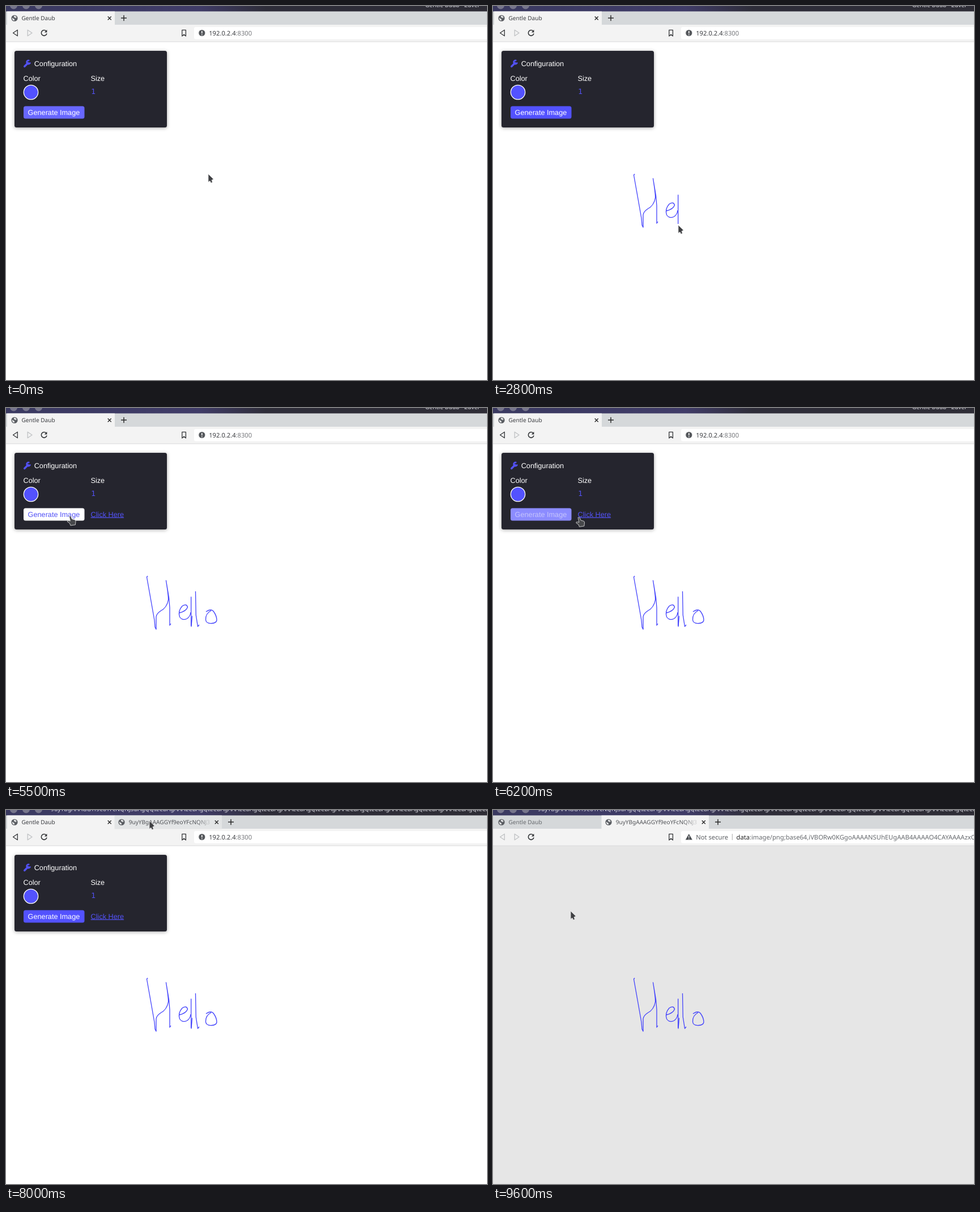
An HTML page for the animation above (9.7 s loop, 849 px wide and 659 px high).

```html
<!DOCTYPE html>
<html lang="en">
<head>
<meta charset="utf-8">
<title>Drawing demo</title>
<style>
  html, body { margin: 0; width: 100%; height: 100%; overflow: hidden; background: #fff; }
  svg { display: block; text-rendering: geometricPrecision; }
  text { white-space: pre; }
  .ui { font: 10.07px "Noto Sans", sans-serif; fill: #3a3c40; }
  .address { font-size: 11.2px; }
  .page { font: 12.7px "Liberation Sans", Arial, sans-serif; fill: #fff; }
  .line { fill: none; stroke-width: 1.3; }
  #panel { filter: drop-shadow(0 1px 3px rgba(0, 0, 0, .35)); }
</style>
</head>
<body>
<svg id="stage" width="849" height="659" viewBox="0 0 849 659">
  <defs>
    <linearGradient id="bar">
      <stop offset="0" stop-color="#3a3960"/><stop offset=".4" stop-color="#403c68"/>
      <stop offset=".54" stop-color="#2e2d39"/><stop offset="1" stop-color="#2e2d36"/>
    </linearGradient>
    <linearGradient id="fade" gradientUnits="userSpaceOnUse" x1="335" x2="362">
      <stop offset="0" stop-color="#505256"/><stop offset="1" stop-color="#505256" stop-opacity=".1"/>
    </linearGradient>
    <g id="globe">
      <circle r="5.6" fill="#5a5d62"/>
      <path d="M-4 -1Q-2.5 1 -.5 1.2Q.8 2 -.6 4.4Q-4 3.6 -4.2 0ZM-.5 -4.4Q2.8 -4.2 3.6 -1.8L2 .2Q1.6 -1.6 -.6 -1.2Q-1.8 -2.6 -.5 -4.4Z" fill="#e6e7e8"/>
    </g>
    <path id="close" d="M-3 -3L3 3M3 -3L-3 3" stroke="#2b2b2b" stroke-width="1.4"/>
  </defs>

  <rect id="canvas" y="63" width="849" height="596"/>
  <g id="panel">
    <rect x="15" y="79" width="269" height="135" rx="3.5" fill="#25252e"/>
    <path d="M32.7 106.5L39 100.2" stroke="#5352f6" stroke-width="3.4" stroke-linecap="round"/>
    <path d="M41.2 96.3A3.1 3.1 0 1 0 42.7 99.5" fill="none" stroke="#5352f6" stroke-width="2.6"/>
    <g class="page">
      <text x="49.7" y="106">Configuration</text>
      <text x="30.5" y="132">Color</text>
      <text x="149.5" y="132">Size</text>
      <text x="150.2" y="154.5" font-family="DejaVu Sans, sans-serif" style="fill:#5352f6">1</text>
      <circle cx="44" cy="152" r="12.7" fill="#5352ff" stroke="#fff" stroke-width="1.3"/>
      <rect id="button" x="31" y="176.5" width="107.5" height="22" rx="3.5"/>
      <text id="label" x="38.6" y="191.5">Generate Image</text>
      <text id="link" x="149.6" y="191.5" style="fill:#5352f6" text-decoration="underline">Click Here</text>
    </g>
  </g>
  <g id="ink" class="line" stroke="#4242fc" stroke-linejoin="round"></g>

  <rect width="849" height="10" fill="url(#bar)"/>
  <g fill="#77768c"><circle cx="13.5" cy="-1" r="6.5"/><circle cx="35.5" cy="-1" r="6.5"/><circle cx="57.5" cy="-1" r="6.5"/></g>
  <text id="title" class="ui" y="2.2" style="fill:#dcdce4;font-size:10.3px"></text>
  <rect y="9.5" width="849" height="24" fill="#d5d8da"/>
  <rect y="33" width="849" height="30" fill="#f3f3f3"/>
  <rect y="62.5" width="849" height="1" fill="#d9dadb"/>
  <rect x="332" y="37" width="530" height="21.5" rx="3" fill="#fff"/>
  <rect id="firstTab" x="2" y="9.5" width="190" height="24" fill="#f3f3f3"/>
  <use href="#globe" x="15" y="21.5"/>
  <text id="firstName" class="ui" x="27.5" y="25.2">Gentle Daub</text>
  <use id="firstClose" href="#close" x="182.7" y="21.5"/>
  <g id="secondTab">
    <rect id="secondBack" x="191.5" y="9.5" width="189.5" height="24"/>
    <use href="#globe" x="204" y="21.5"/>
    <text id="secondName" class="ui" x="216.7" y="25.2" style="fill:url(#fade)"></text>
    <use href="#close" x="371.8" y="21.5"/>
  </g>
  <path id="plus" d="M-5 0H5M0 -5V5" stroke="#2b2b2b" stroke-width="1.5"/>
  <g class="line" stroke="#343639" stroke-linejoin="round">
    <path id="back" d="M12.5 47.5L20.3 42.2V52.8Z"/>
    <path d="M46 47.5L38.2 42.2V52.8Z" stroke="#bfc1c3"/>
    <path d="M71 44.3A4.9 4.9 0 1 0 72 48.5" stroke-width="1.6"/>
    <path d="M72.4 41.8V46.4H67.8Z" fill="#343639" stroke="none"/>
    <path d="M310.8 42.3H317.4V53L314.1 50.2L310.8 53Z"/>
  </g>
  <g id="localSite">
    <circle cx="345.8" cy="47.5" r="5.6" fill="#55585c"/>
    <path d="M345.8 44V48.6M345.8 50V51.4" stroke="#fff" stroke-width="1.5"/>
    <text class="ui address" x="358.2" y="51.5">192.0.2.4<tspan fill="#77797d">:8300</tspan></text>
  </g>
  <g id="imageSite">
    <path d="M345.8 42L351.8 52.6H339.8Z" fill="#484b4f"/>
    <path d="M345.8 45.4V49M345.8 50.2V51.4" stroke="#fff" stroke-width="1.2"/>
    <text class="ui address" x="358.3" y="51.5" style="fill:#5c5f63">Not secure</text>
    <path d="M422.3 42V53" stroke="#aaa"/>
    <text class="ui address" x="429.5" y="51.5" style="fill:#66696d"><tspan fill="#222">data</tspan><tspan>:image/png;</tspan><tspan id="payload"></tspan></text>
  </g>

  <g id="menu" class="ui"></g>
  <g id="arrow" stroke="#e8e8e8" stroke-width=".8" fill="#3f4043">
    <path d="M0 0V14.2L3 12.2L4.8 15.8L7.4 14.6L6 10.8L9.4 9.2Z"/>
  </g>
  <g id="hand" stroke="#e8e8e8" stroke-width=".8" fill="#47484b">
    <path d="M-1.3 1Q0 -.8 1.4 .8L3.4 5.6L8.4 7Q10.2 7.6 10 9.8L9.4 15.8L.9 17L-.6 13L-4.4 10.6Q-5.4 8.6 -3.2 8.4L.4 9.2Z"/>
  </g>
</svg>
<script>
const LOOP = 9700, STEP = 100;
const $ = id => document.getElementById(id);
const SVG_NS = "http://www.w3.org/2000/svg";

// Spans in which the picture rests at its earlier state.
const rests = [[2400, 2800], [3600, 3900], [4600, 4900], [5200, 5500],
  [5700, 6000], [6900, 7100], [7500, 7800], [8300, 8600]];

const strokes = [
  [1600, 2100, "M250 296L248.5 298L256 340L262 374L263 386L265 390V368Q266 362 273 357.5Q284 352 286.5 338Q287 332 282.5 304L287.5 334L289 352V383L291 380"],
  [2200, 2700, "M306 361Q318 358 320.5 351Q319 344 311 349Q303 358 306.5 368Q311 375 319 371.5Q325 368 326 360"],
  [2700, 2800, "M326.7 332.5V384"],
  [2800, 2900, "M326.7 384L328.5 367L327 385.5"],
  [2900, 3200, "M334.5 323L335.3 365L338.5 385L341 382"],
  [3300, 3600, "M353 359Q362 353 366 358Q372 366 372 374Q371 379 363 379.5Q353 380 352.5 373Q352 362 362 357"]
].map(([from, to, d]) => {
  const path = document.createElementNS(SVG_NS, "path");
  path.setAttribute("d", d);
  $("ink").append(path);
  return { from, to, path, length: path.getTotalLength() };
});

const moves = [
  [0, 357, 296], [300, 490, 338], [500, 700, 240], [650, 776, 110], [750, 720, 0],
  [950, 420, 60], [1100, 240, 96], [1300, 120, 186], [1600, 249, 297], [2100, 291, 380],
  [2200, 306, 361], [2800, 327, 386], [2900, 334, 323], [3200, 341, 382], [3300, 353, 359],
  [3600, 362, 357], [3900, 371, 372], [4200, 250, 280], [4500, 120, 193], [4900, 110, 194],
  [5200, 113, 190], [6000, 113, 190], [6400, 190, 194.5], [7500, 190, 194.5], [7800, 225, 90],
  [7900, 253, 19], [8200, 253, 19], [8300, 262, 30], [8600, 370, 100], [8800, 466, 230],
  [9100, 350, 390], [9400, 124, 280], [9600, 137, 178]
];
const hover = [[0, .12], [200, 0], [1200, 0], [1300, .5], [1500, 0],
  [4400, 0], [4600, 1], [6000, 1], [6300, 0]];

const secondName = "9uyYBgAAAGGYf9eoYFcNQNJ3";
$("secondName").textContent = secondName;
$("payload").textContent = "base64,iVBORw0KGgo" + "A".repeat(4) + "NSUhEUgAAB4" + "A".repeat(4) + "O4CAY" + "A".repeat(4) + "zxCB";
const longTitle = secondName + "BAgQQ" + "IECBAgAAAECBAgQ".repeat(9);

function buildMenu() {
  const items = [["Open link in new tab", 201.7], ["Open link in new window", 221.5],
    ["Open link in private window", 241.3], ["Open link in private window with Lur", 261],
    ["Save link as…", 289.7], ["Copy link address", 309.4], ["Zuvel", 338], ["Inspect", 366.5]];
  const texts = items.map(([name, y]) => `<text x="196.7" y="${y}">${name}</text>`).join("");
  const rules = [271, 319.8, 348.4].map(y => `M168 ${y}H445`).join("");
  $("menu").innerHTML = `
    <rect x="168.4" y="184.9" width="276.4" height="189.8" fill="#fff" stroke="#cfd0d2"/>
    <rect x="169" y="188" width="275.5" height="19.5" fill="#e4e4e4"/>
    <path d="${rules}" stroke="#cfd0d2"/><g fill="#2f3236">${texts}</g>
    <circle cx="181" cy="334" r="6" fill="#ee6530"/>
    <path d="M434.5 330.8L439 334L434.5 337.2Z" fill="#55585c"/>
    <text x="427" y="366.5" text-anchor="end" fill="#6c6f73">Ctrl+Shift+I</text>`;
}

function track(keys, t) {
  const next = keys.findIndex(key => key[0] > t);
  if (next < 0) return keys[keys.length - 1].slice(1);
  const a = keys[next - 1], b = keys[next];
  const k = (t - a[0]) / (b[0] - a[0]);
  return a.slice(1).map((v, i) => v + (b[i + 1] - v) * k);
}

const show = (id, on) => $(id).setAttribute("visibility", on ? "visible" : "hidden");
const fill = (id, color) => { $(id).style.fill = color; };
const mix = (a, b, k) => `rgb(${a.map((v, i) => Math.round(v + (b[i] - v) * k))})`;
const inside = (x, y, left, top, right, bottom) => x >= left && x <= right && y >= top && y <= bottom;

function drawInk(t) {
  let tip = null;
  for (const { from, to, path, length } of strokes) {
    const k = Math.min(1, Math.max(0, (t - from) / (to - from)));
    path.setAttribute("visibility", k > 0 ? "visible" : "hidden");
    path.setAttribute("stroke-dasharray", k < 1 ? `${k * length} ${length + 9}` : "none");
    if (t >= from && t < to && t !== 2800) tip = path.getPointAtLength(k * length);
  }
  return tip;
}

function drawBrowser(t) {
  const image = t >= 8200, renamed = t >= 8000, hasTab = t >= 7300;
  fill("canvas", image ? "#e6e6e6" : "#fff");
  show("panel", !image);
  show("firstTab", !image);
  show("firstClose", !image);
  fill("firstName", image ? "#66696d" : "#3a3c40");
  show("secondTab", hasTab);
  fill("secondBack", image ? "#f3f3f3" : t >= 7900 ? "#e3e5e6" : "#d5d8da");
  $("plus").setAttribute("transform", `translate(${hasTab ? 397 : 208} 21.3)`);
  $("back").setAttribute("stroke", image ? "#bfc1c3" : "#343639");
  show("localSite", !image);
  show("imageSite", image);
  $("title").textContent = renamed ? longTitle : "Gentle Daub - Zuvel";
  $("title").setAttribute("x", renamed ? 79 : 835);
  $("title").setAttribute("text-anchor", renamed ? "start" : "end");
}

function draw(time) {
  let t = Math.floor((time % LOOP) / STEP) * STEP;
  const rest = rests.find(([from, to]) => t >= from && t < to);
  if (rest) t = rest[0];

  drawBrowser(t);
  const linked = t >= 5500 && t < 8200;
  $("link").style.display = linked ? "" : "none";
  const [lit] = track(hover, t);
  fill("button", mix([83, 82, 255], [255, 255, 255], lit));
  fill("label", mix([255, 255, 255], [83, 82, 246], lit < .3 ? 0 : lit));

  const open = t >= 6900 && t < 7300;
  $("menu").style.display = open ? "" : "none";
  $("menu").setAttribute("opacity", t < 7100 ? .74 : 1);

  const tip = drawInk(t);
  const [x, y] = tip ? [tip.x, tip.y] : track(moves, t);
  const pointing = t < 8200 && (inside(x, y, 31, 176, 138, 199) || linked && inside(x, y, 149, 178, 209, 197));
  show("hand", pointing);
  show("arrow", !pointing);
  $(pointing ? "hand" : "arrow").setAttribute("transform", `translate(${x} ${y})`);
}

buildMenu();
const start = performance.now();
function tick() {
  draw(performance.now() - start);
  requestAnimationFrame(tick);
}
tick();
</script>
</body>
</html>
```
